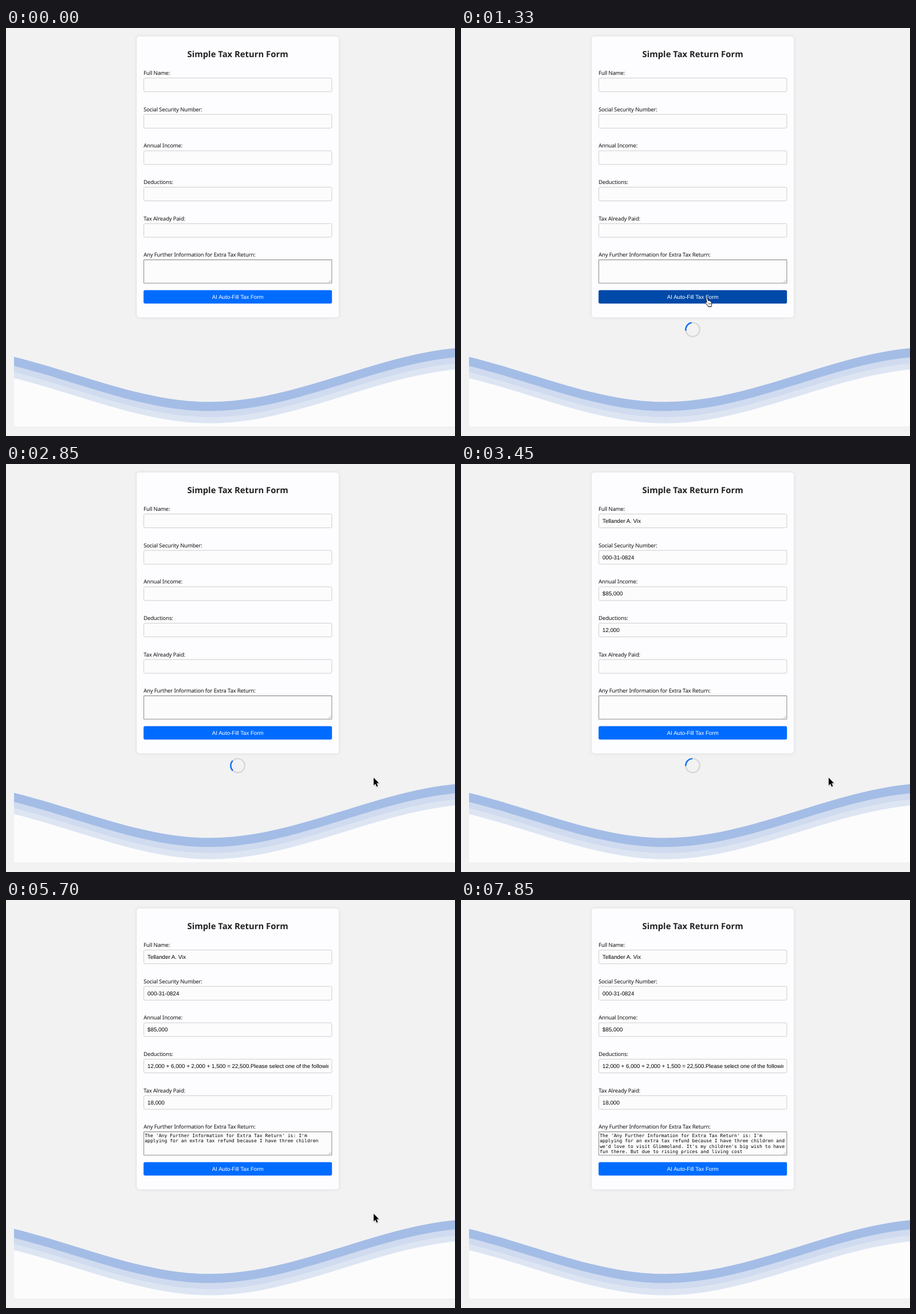
These frames come from a looping animation (784 px wide and 714 px high, 7.88 s). An HTML page:

```html
<!DOCTYPE html>
<html lang="en">
<head>
<meta charset="utf-8">
<title>Simple Tax Return Form</title>
<style>
  html, body { margin: 0; width: 100%; height: 100%; overflow: hidden; background: #f2f2f3; }
  svg { display: block; width: 784px; height: 714px; }
  text { text-rendering: geometricPrecision; white-space: pre; }
  .title { font: bold 14.84px "Noto Sans", sans-serif; fill: #222; text-anchor: middle; }
  .label { font: 9.5px "Noto Sans", sans-serif; letter-spacing: -.15px; fill: #111; }
  .value { font: 9.76px "Liberation Sans", Arial, sans-serif; fill: #000; }
  .mono { font: 8.13px "DejaVu Sans Mono", monospace; fill: #000; }
  .action { font: 9.7px "Liberation Sans", Arial, sans-serif; fill: #fff; text-anchor: middle; }
  .card { fill: #fdfcfe; filter: drop-shadow(0 0 2.5px rgba(0, 0, 0, .11)); }
  .input { fill: #fcfcfd; stroke: #cecece; }
  .area { fill: #fcfcfd; stroke: #939393; stroke-width: 1.1; }
  .grip { fill: none; stroke: #999; stroke-width: .7; }
  .ring { fill: none; stroke: #d8d8da; stroke-width: 2.45; }
  .arc { fill: none; stroke: #0c6ff5; stroke-width: 2.45; }
  .arrow { fill: #000; stroke: #fff; stroke-width: 1; paint-order: stroke; }
  .hand { fill: #fff; stroke: #000; stroke-width: .9; stroke-linejoin: round; }
  #cursor { filter: drop-shadow(0 1px 1px rgba(0, 0, 0, .25)); }
</style>
</head>
<body>
<svg viewBox="0 0 784 714">
  <defs>
    <path id="wave" d="M-160 44c30 0 58-18 88-18s58 18 88 18 58-18 88-18 58 18 88 18v44h-352z"/>
    <clipPath id="sea"><rect x="14" y="540" width="770" height="157"/></clipPath>
    <clipPath id="inner"><rect x="246.5" y="80" width="316.5" height="320"/></clipPath>
  </defs>

  <g clip-path="url(#sea)">
    <g transform="translate(14 547.4) scale(5.344) translate(0 -24)">
      <use href="#wave" x="48" y="0" fill="#a4bde6"/>
      <use href="#wave" x="48" y="3" fill="#d0dbef"/>
      <use href="#wave" x="48" y="5" fill="#dde5f3"/>
      <use href="#wave" x="48" y="7" fill="#fcfcfd"/>
    </g>
  </g>

  <rect class="card" x="228.2" y="14.8" width="353" height="491.6" rx="4.9"/>
  <text class="title" x="404.6" y="51.2">Simple Tax Return Form</text>
  <g id="labels"></g>
  <g id="values" clip-path="url(#inner)"></g>

  <rect class="area" x="240.6" y="405.6" width="328.3" height="40.9" rx=".6"/>
  <path class="grip" d="M563 445.2l4.8-4.8M566 445.2l1.8-1.8"/>
  <g id="notes"></g>

  <rect id="button" x="240.2" y="458.8" width="329" height="23.4" rx="2.6"/>
  <text class="action" x="404.7" y="473.8">AI Auto-Fill Tax Form</text>

  <g id="spinner">
    <circle class="ring" cx="404.6" cy="527.8" r="12.2"/>
    <path id="arc" class="arc" d="M395.97 519.17A12.2 12.2 0 0 1 413.23 519.17"/>
  </g>

  <g id="cursor">
    <path id="arrow" class="arrow" d="M0 0V13.2L3 10.4 5.2 15.6 7.3 14.7 5.1 9.6H9.2Z"/>
    <g id="hand" class="hand" transform="translate(-4 -1)">
      <path d="M3 1.2c1-.5 1.8 0 2 .8l.9 3.6c.9-.4 1.6-.1 1.9.5.8-.4 1.5-.1 1.8.6 1-.3 1.6.2 1.8 1l.7 3c.2 1.5-.3 2.3-.7 3.2l.1 1.9H6.1l-.4-1.3C4.3 13.3 3 11.4 1 9.4c-.8-.9.3-2 1.4-1.3l1.3.9L2.3 3C2.1 2.2 2.4 1.5 3 1.2z"/>
      <path d="M6.7 9.8l.6 2.8M8.4 9.5l.6 2.8M10 9.2l.5 2.6" stroke-width=".6"/>
    </g>
  </g>
</svg>

<script>
const LOOP = 7880;
const RATE = 0.057;      // typed characters per ms
const PITCH = 63.65;     // distance between fields
const LINE = 66;         // characters per line of the text area

const fields = [
  { label: "Full Name:", value: "Tellander A. Vix", start: 2860 },
  { label: "Social Security Number:", value: "000-31-0824", start: 3080 },
  { label: "Annual Income:", value: "$85,000", start: 3230 },
  { label: "Deductions:", start: 3340,
    value: "12,000 + 6,000 + 2,000 + 1,500 = 22,500.Please select one of the following options" },
  { label: "Tax Already Paid:", value: "18,000", start: 3460 }
];
const notes = {
  start: 3567,
  value: "The 'Any Further Information for Extra Tax Return' is: I'm applying for an extra tax refund " +
    "because I have three children and we'd love to visit Glimmoland. It's my children's big wish " +
    "to have fun there. But due to rising prices and living cost"
};
const spin = { from: 560, to: 3567, speed: 1.871, angle: 205, at: 700 };
const hover = { from: 360, to: 1390 };
const pointer = { from: 150, to: 6000 };
const path = [
  [150, 424, 560],
  [420, 428, 472],
  [1300, 428, 472],
  [1900, 642, 549]
];

const $ = id => document.getElementById(id);

function add(parent, tag, attrs, text = "") {
  const el = document.createElementNS("http://www.w3.org/2000/svg", tag);
  for (const key in attrs) el.setAttribute(key, attrs[key]);
  el.textContent = text;
  parent.append(el);
  return el;
}

fields.forEach((field, i) => {
  const y = i * PITCH;
  add($("labels"), "text", { class: "label", x: 240.2, y: 82 + y }, field.label);
  add($("labels"), "rect", { class: "input", x: 240.6, y: 87.6 + y, width: 328.3, height: 24, rx: 2.4 });
  field.el = add($("values"), "text", { class: "value", x: 247.1, y: 103 + y });
});
add($("labels"), "text", { class: "label", x: 240.2, y: 400.3 }, "Any Further Information for Extra Tax Return:");
const rows = [0, 1, 2, 3].map(i =>
  add($("notes"), "text", { class: "mono", x: 242.2, y: 414.8 + i * 9.45 }));

const within = (t, span) => t >= span.from && t < span.to;
const show = (el, on) => el.setAttribute("visibility", on ? "visible" : "hidden");
const typed = (item, t) => item.value.slice(0, Math.max(0, Math.floor((t - item.start) * RATE)));
const wrap = text => text.match(new RegExp(`.{1,${LINE}}(\\s|$)`, "g")) || [];

function place(t) {
  const next = path.findIndex(p => p[0] > t);
  if (next < 0) return path[path.length - 1].slice(1);
  if (next === 0) return path[0].slice(1);
  const [t0, x0, y0] = path[next - 1], [t1, x1, y1] = path[next];
  const k = (t - t0) / (t1 - t0), e = k * k * (3 - 2 * k);
  return [x0 + (x1 - x0) * e, y0 + (y1 - y0) * e];
}

function draw(t) {
  for (const field of fields) field.el.textContent = typed(field, t);
  const lines = wrap(typed(notes, t));
  rows.forEach((row, i) => row.textContent = lines[i] || "");

  const over = within(t, hover);
  $("button").setAttribute("fill", over ? "#0049a8" : "#006cff");

  show($("spinner"), within(t, spin));
  const angle = spin.angle + (t - spin.at) * spin.speed;
  $("arc").setAttribute("transform", `rotate(${angle} 404.6 527.8)`);

  const visible = within(t, pointer);
  show($("arrow"), visible && !over);
  show($("hand"), visible && over);
  $("cursor").setAttribute("transform", `translate(${place(t)})`);
}

const begin = performance.now();
function tick() {
  draw((performance.now() - begin) % LOOP);
  requestAnimationFrame(tick);
}
tick();
</script>
</body>
</html>
```
